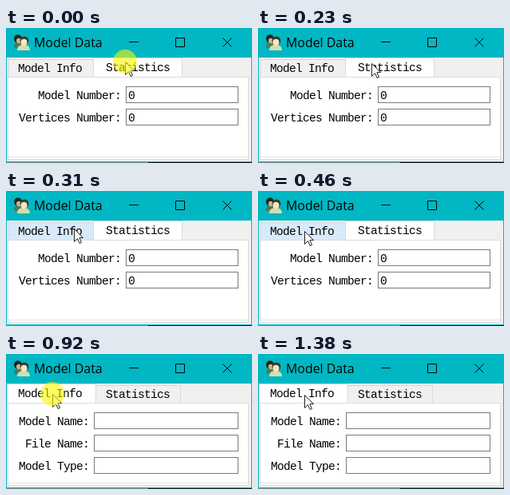
An HTML page that plays this animation: 308 by 169 pixels, repeating every 1.55 s.

```html
<!DOCTYPE html>
<html lang="en">
<head>
<meta charset="utf-8">
<title>Model Data</title>
<style>
  html, body { margin: 0; width: 100%; height: 100%; overflow: hidden; background: #00b7c3; }
  svg { display: block; width: 308px; height: 169px; }
  text { white-space: pre; fill: #000; }
  .title { font: 15.9px "Open Sans", "Noto Sans", sans-serif; }
  .mono { font: 14.6px "Liberation Mono", "Courier New", monospace; letter-spacing: -.76px; }
  .line { fill: none; stroke: #000; }
</style>
</head>
<body>
<svg viewBox="0 0 308 169">
  <rect width="308" height="169" fill="#00b7c3"/>
  <rect y="168" width="178" height="1" fill="#888"/>
  <rect x="178" y="168" width="130" height="1" fill="#201a14"/>

  <g id="icon">
    <path d="M10 25q0-7 6-7t6 7z" fill="#4d7a58"/>
    <ellipse cx="15" cy="13.5" rx="5" ry="5.2" fill="#1c2623"/>
    <ellipse cx="16" cy="16" rx="3" ry="3.2" fill="#c9b98c"/>
    <path d="M14 28q0-7 8-7t8 7z" fill="#d5dcae"/>
    <ellipse cx="23" cy="16" rx="5.4" ry="5.6" fill="#3a382c"/>
    <ellipse cx="22.5" cy="18" rx="4" ry="4.2" fill="#f3e8c0"/>
  </g>
  <text class="title" x="35" y="24">Model Data</text>
  <path class="line" d="M154 17.5h12M212.5 12.5h11v11h-11z"/>
  <path class="line" d="M271.5 12.5l11 11m0-11l-11 11"/>

  <rect x="1" y="37" width="306" height="130" fill="#f0f0f0"/>
  <rect x="2.5" y="61.5" width="301" height="103" fill="#fff" stroke="#dcdcdc"/>
  <path d="M3 161.5h300" stroke="#e4e4e4"/>

  <g id="stats"></g>
  <g id="info"></g>
  <path id="cursor" d="M.5.5v16l4-4 2.6 6 2.4-1-2.6-5.9h4.6z" fill="#fff" stroke="#222"/>
  <circle id="click" r="15" fill="#faf800" fill-opacity=".6"/>
</svg>
<script>
const NS = "http://www.w3.org/2000/svg";
const $ = id => document.getElementById(id);

function add(parent, tag, attrs, content = "") {
  const el = document.createElementNS(NS, tag);
  for (const k in attrs) el.setAttribute(k, attrs[k]);
  el.textContent = content;
  parent.append(el);
  return el;
}

const label = (g, x, y, s) => add(g, "text", { class: "mono", x, y }, s);

function tab(g, x, width, active, textX, name) {
  const top = active ? 37.5 : 39.5;
  const r = add(g, "path", {
    d: `M${x + .5} 61V${top}h${width - 1}V61`,
    fill: active ? "#fff" : "#f0f0f0", stroke: "#d9d9d9"
  });
  label(g, textX, active ? 54 : 55, name);
  return r;
}

function field(g, row, x, name, value = "") {
  const y = 73 + row * 28;
  label(g, x - 6 - name.length * 8, y + 16, name);
  add(g, "rect", { x: x + .5, y: y + .5, width: 290 - x, height: 20, fill: "#fff", stroke: "#7a7a7a" });
  if (value) label(g, x + 3, y + 16, value);
}

const stats = $("stats"), info = $("info");
const hoverTab = tab(stats, 3, 107, false, 15, "Model Info");
tab(stats, 109, 112, true, 125, "Statistics");
field(stats, 0, 150, "Model Number:", "0");
field(stats, 1, 150, "Vertices Number:", "0");

tab(info, 112, 107, false, 125, "Statistics");
tab(info, 1, 112, true, 15, "Model Info");
["Model Name:", "File Name:", "Model Type:"].forEach((s, i) => field(info, i, 110, s));

// time, pointer x, pointer y, pressed, hovered, second page
const steps = [
  [0, 149, 42, 1, 0, 0],
  [150, 149, 42, 0, 0, 0],
  [230, 142, 44, 0, 0, 0],
  [310, 85, 47, 0, 1, 0],
  [380, 64, 49, 0, 1, 0],
  [460, 58, 50, 0, 1, 0],
  [920, 58, 50, 1, 0, 1],
  [1000, 58, 50, 0, 0, 1],
  [1380, 58, 51, 0, 0, 1]
];
const LOOP = 1550;
const show = (el, on) => el.setAttribute("visibility", on ? "visible" : "hidden");

function draw(now) {
  const t = now % LOOP;
  const [, x, y, pressed, hovered, second] = steps.filter(s => s[0] <= t).pop();
  const at = `translate(${x} ${y})`;
  $("cursor").setAttribute("transform", at);
  $("click").setAttribute("transform", at);
  show($("click"), pressed);
  show(stats, !second);
  show(info, second);
  hoverTab.setAttribute("fill", hovered ? "#d8eaf9" : "#f0f0f0");
}

const start = performance.now();
function tick() {
  draw(performance.now() - start);
  requestAnimationFrame(tick);
}
tick();
</script>
</body>
</html>
```
